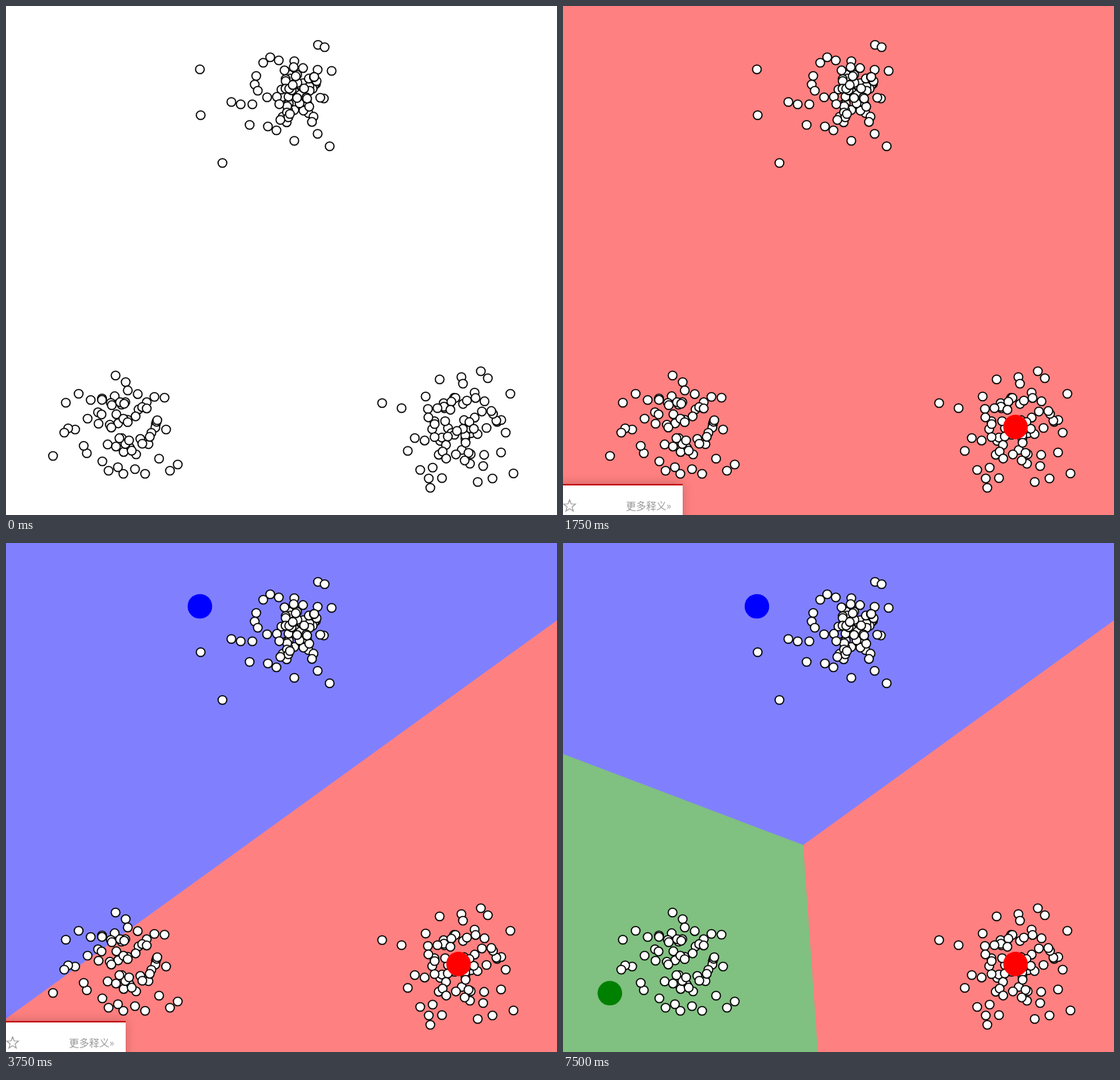
An HTML page for the animation above (8 s loop, 709x655 px).

```html
<!DOCTYPE html>
<html lang="zh">
<head>
<meta charset="utf-8">
<title>K-means: choosing centroids</title>
<style>
  html, body { margin: 0; width: 100%; height: 100%; overflow: hidden; background: #fff; }
  svg { display: block; width: 100%; height: 100%; }
  #points circle { fill: #fff; stroke: #000; stroke-width: 1.5; }
  #popup rect { filter: drop-shadow(0 0 7px rgba(0, 0, 0, .22)); }
  #popup text { font: 13px "Noto Sans CJK SC", "Noto Sans CJK", sans-serif; fill: #999; }
</style>
</head>
<body>
<svg viewBox="0 0 709 655">
  <rect id="redArea" width="709" height="655" fill="#ff8080"/>
  <path id="blueArea" d="M0 0H709V99.5L0 612Z" fill="#8080ff"/>
  <path id="greenArea" d="M0 271.5L309 388.5L328 655H0Z" fill="#80c080"/>
  <g id="points"></g>
  <circle id="redDot" r="15.8" cx="582.3" cy="541.7" fill="#f00"/>
  <circle id="blueDot" r="15.8" fill="#00f"/>
  <circle id="greenDot" r="15.8" fill="#008000"/>
  <g id="popup">
    <rect x="-40" y="615" width="194" height="80" fill="#fff"/>
    <path d="M-40 616H154" stroke="#c4161c" stroke-width="2"/>
    <path id="star" fill="none" stroke="#999" stroke-width="1.1"/>
    <text x="81" y="648">更多释义»</text>
  </g>
</svg>
<script>
const LOOP = 8000;
const $ = id => document.getElementById(id);

// Each cluster: scattered rim points plus a random core filling an ellipse.
const clusters = [
  { x: 374, y: 118, rx: 32, ry: 43, core: 58, power: .62, rim: [
    [249.5, 81.5], [250.5, 140.5], [278.5, 202], [290, 123.5], [302, 126.5], [317, 126.5],
    [313.5, 153], [401.5, 50], [410, 53], [419, 83.5], [416.5, 180.5], [371, 173.5],
    [401, 164.5], [340, 66], [331, 73], [351, 70], [371, 71], [401, 82], [322, 90],
    [320, 101], [324, 109], [348, 160], [336, 117.5], [409, 119], [337, 155]] },
  { x: 151, y: 537, rx: 44, ry: 44, core: 45, power: .55, rim: [
    [60.5, 579], [77, 510.5], [93.5, 499], [109, 507], [141, 475.5], [154, 484],
    [191, 503], [204, 504], [206, 545], [221, 590], [211, 598], [179, 602], [151, 602],
    [132, 598], [104, 575.5], [100, 566], [89, 545], [80, 543.5], [75, 549], [124, 586],
    [144, 593.5], [197, 582.5], [166, 596], [105, 531]] },
  { x: 585, y: 544, rx: 55, ry: 43, core: 57, power: .58, rim: [
    [484, 511], [509, 517.5], [558, 480.5], [586, 477.5], [611, 470], [620, 479],
    [649, 499], [653, 601.5], [626, 608], [607, 612.5], [546, 620], [544, 608],
    [561, 607.5], [533, 597], [517, 572.5], [526, 556], [637, 574.5], [643, 549],
    [540, 502.5], [588, 486], [603, 497.5], [614, 592], [549, 594], [597, 589]] }
];

let seed = 7;
const random = () => {
  seed = (seed * 16807) % 2147483647;
  return seed / 2147483647;
};

function addPoint(x, y) {
  const circle = document.createElementNS("http://www.w3.org/2000/svg", "circle");
  circle.setAttribute("cx", x);
  circle.setAttribute("cy", y);
  circle.setAttribute("r", 5.6);
  $("points").append(circle);
}

for (const c of clusters) {
  c.rim.forEach(([x, y]) => addPoint(x, y));
  for (let i = 0; i < c.core; i++) {
    const angle = random() * 2 * Math.PI;
    const radius = random() ** c.power;
    addPoint(c.x + c.rx * radius * Math.cos(angle), c.y + c.ry * radius * Math.sin(angle));
  }
}

const starPoints = Array.from({ length: 10 }, (_, i) => {
  const radius = i % 2 ? 3.4 : 8;
  const angle = (i / 5 - .5) * Math.PI;
  return [8.5 + radius * Math.cos(angle), 643.5 + radius * Math.sin(angle)];
});
$("star").setAttribute("d", "M" + starPoints.join("L") + "Z");

const show = (id, visible) => $(id).setAttribute("visibility", visible ? "visible" : "hidden");
const move = (id, x, y) => $(id).setAttribute("transform", `translate(${x} ${y})`);

function render(t) {
  show("redArea", t >= 1000);
  show("redDot", t >= 1250);
  show("popup", t >= 1500 && t < 7000);
  show("blueArea", t >= 3500);
  show("blueDot", t >= 3500);
  show("greenArea", t >= 5750);
  show("greenDot", t >= 5750);
  t < 1750 ? move("popup", -28, 14) : move("popup", 0, 0);
  t < 3750 ? move("blueDot", 537, 479) : move("blueDot", 249.5, 81.5);
  t < 6000 ? move("greenDot", 150.5, 342) : move("greenDot", 60.3, 579.3);
}

function tick() {
  render(performance.now() % LOOP);
  requestAnimationFrame(tick);
}
tick();
</script>
</body>
</html>
```
